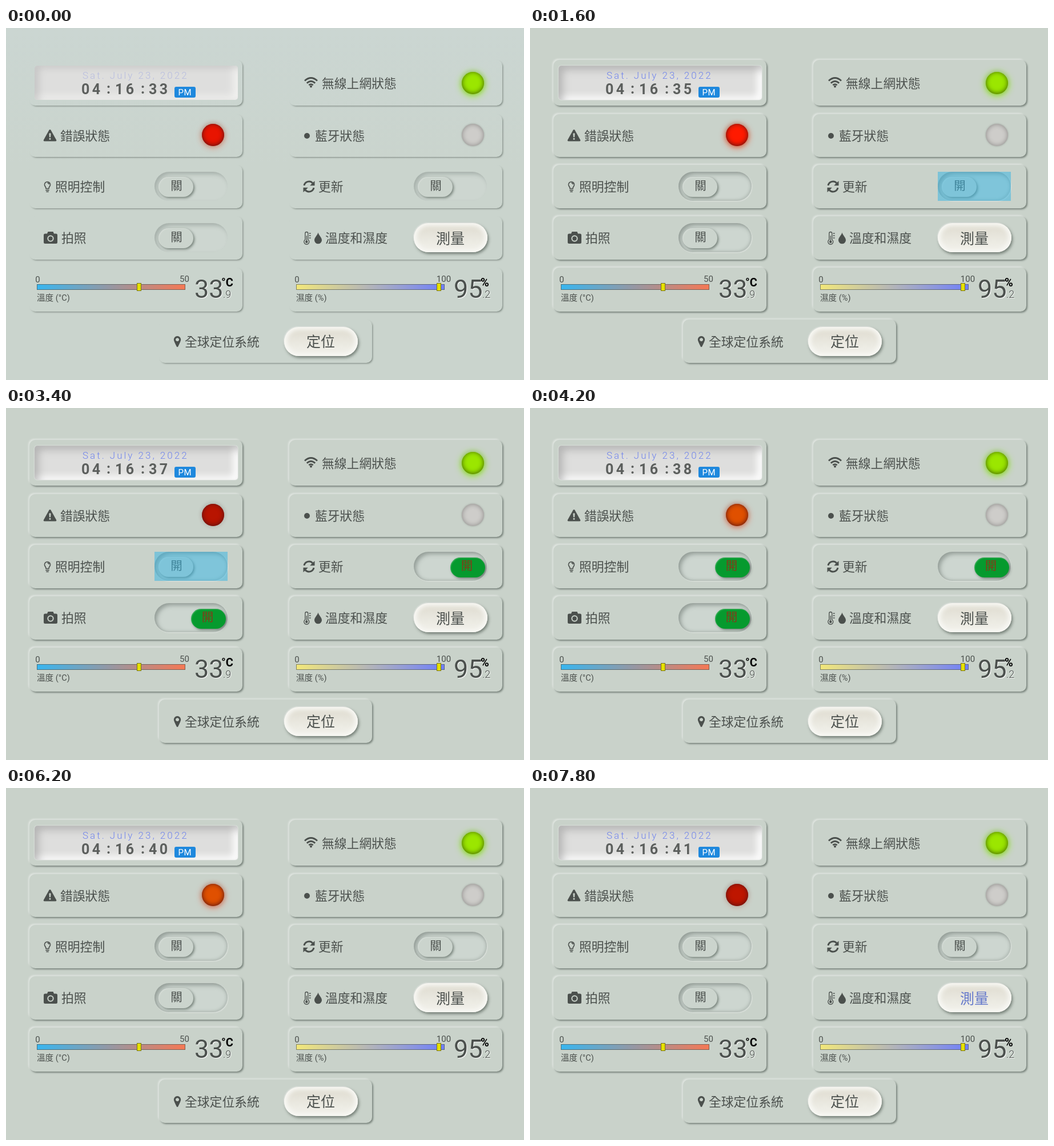
An HTML page that plays this animation: 907x617 px, repeating every 8000 ms.

```html
<!DOCTYPE html>
<html lang="zh-TW">
<head>
<meta charset="utf-8">
<title>控制面板</title>
<style>
:root { --bg: #c9d2ca; --ink: #4b504d; --light: rgba(255,255,255,.42); }
html, body { margin: 0; width: 100%; height: 100%; overflow: hidden; background: var(--bg); }
#stage { position: absolute; inset: 0; background: var(--bg); }
#stage.faint { --light: transparent; background: linear-gradient(#cbd6d2, #cad4cd 40%); }
#stage div, svg { position: absolute; box-sizing: border-box; }
svg { left: 0; top: 0; }
.panel { border-radius: 10px; background: var(--bg);
  box-shadow: 2px 2px 3px rgba(88,100,92,.7), -2px -2px 3px var(--light); }
.faint .panel { background: transparent; box-shadow: 2px 2px 3px -1px rgba(88,100,92,.7); }
.clock { border-radius: 5px; background: #dededd;
  box-shadow: inset 7px 7px 14px rgba(140,140,140,.5), inset -8px -6px 12px #fff, 0 0 2px rgba(255,255,255,.8); }
.faint .clock { box-shadow: inset 8px 4px 12px rgba(165,165,165,.4), inset -8px -6px 14px #f2f2f0; }
.pm { border-radius: 3px; background: #1e88dd; }
.led { border-radius: 50%; }
.track { border-radius: 26px; background: #cdd6d0;
  box-shadow: inset 4px 4px 7px rgba(95,105,100,.5), inset -2px -2px 4px rgba(130,140,134,.3), 1px 1px 2px var(--light); }
.faint .track { box-shadow: inset 4px 4px 7px rgba(95,105,100,.35); }
.knob { border-radius: 18px; box-shadow: 2px 2px 4px rgba(80,92,84,.7), inset 1px 1px 2px rgba(255,255,255,.25); }
.button { border-radius: 26px; background: linear-gradient(#dedbcf, #eeede6 75%);
  box-shadow: inset 0 0 7px 5px #f8f8f4, 2px 3px 5px rgba(85,96,88,.75), -1px -1px 2px rgba(255,255,255,.5); }
.bar { border: 1px solid rgba(75,80,77,.65); }
.mark { background: #e6e000; border: 1px solid #77731c; }
.tap { background: rgba(51,181,229,.5); }
text { font-family: Roboto, "Noto Sans CJK TC", "Noto Sans CJK", sans-serif; fill: var(--ink); }
.label { font-size: 21.8px; font-weight: 300; }
.big { font-size: 25px; font-weight: 300; text-anchor: middle; }
.state { font-size: 20.5px; font-weight: 300; text-anchor: middle; }
.date { font-size: 17px; font-weight: 300; letter-spacing: 3px; fill: #6f83ec; }
.faint .date { fill: #b7bcdf; }
.time { font-size: 25px; font-weight: 700; letter-spacing: 4.5px; fill: #5c5f5d; }
.ampm { font-size: 15px; letter-spacing: .5px; fill: #fff; }
.scale { font-size: 15px; text-anchor: middle; }
.caption { font-size: 14.6px; }
.value { font-size: 45px; text-shadow: 1px 1px 1px #fff; }
.decimal { font-size: 18px; font-weight: 300; text-shadow: 1px 1px 1px #fff; }
.unit { font-size: 20px; font-weight: 700; fill: #000; }
.icons { fill: var(--ink); }
.line { fill: none; stroke: var(--ink); stroke-width: 2; stroke-linecap: round; }
</style>
</head>
<body>
<div id="stage"></div>
<script>
const STEP = 200, LOOP = 8000;
const stage = document.getElementById('stage');
const svgNS = 'http://www.w3.org/2000/svg';

function box(cls, x, y, w, h, style = '') {
  const el = document.createElement('div');
  el.className = cls;
  el.style.cssText = `left:${x}px;top:${y}px;width:${w}px;height:${h}px;${style}`;
  stage.append(el);
  return el;
}

// Boxes lie below the drawing layer; tap highlights are added above it.
[[41, 56, 80], [41, 151, 75], [41, 240, 76], [41, 330, 76], [41, 420, 77],
 [496, 56, 80], [496, 151, 75], [496, 240, 76], [496, 330, 76], [496, 420, 77],
 [268, 511, 76]].forEach(([x, y, h]) => box('panel', x, y, 373, h));
box('clock', 50, 66, 356, 60);
box('pm', 295, 103, 37, 19);
const led = (x, y, style) => box('led', x, y, 39, 39, style);
led(798, 77, 'background:#9be600;box-shadow:0 -1px 7px 1px rgba(0,0,0,.12),inset 0 -1px 9px #3f6002,0 2px 13px #89f000');
led(798, 168, 'background:#cecdca;box-shadow:inset 0 0 8px #8a8886,0 0 3px rgba(110,115,110,.5)');
const red = led(343, 168);
box('button', 714, 342, 129, 51);
box('button', 487, 524, 129, 51);

const toggles = [
  { x: 260, y: 252, on: 3400, off: 4600 },
  { x: 260, y: 342, on: 2600, off: 4800 },
  { x: 714, y: 252, on: 1600, off: 5600 }
];
for (const s of toggles) {
  box('track', s.x, s.y, 128, 51);
  s.knob = box('knob', s.x + 7, s.y + 9, 61, 35);
}
const meters = [
  { x: 54, mark: 229, max: '50', from: '#38b6f0', to: '#f67854', name: '溫度 (°C)', value: '33', decimal: '.9', unit: '°C' },
  { x: 508, mark: 754, max: '100', from: '#f3e87a', to: '#7080fa', name: '濕度 (%)', value: '95', decimal: '.2', unit: '%' }
];
for (const m of meters) {
  box('bar', m.x, 448.5, 260, 10, `background:linear-gradient(90deg,${m.from},${m.to}) border-box`);
  box('mark', m.mark, 447, 8, 14);
}

const svg = document.createElementNS(svgNS, 'svg');
svg.setAttribute('width', 907);
svg.setAttribute('height', 617);
svg.innerHTML = `<g class="icons">
  <path class="line" style="stroke-width:2.8;stroke-linecap:butt"
    d="M523 92.5Q534 82.5 545 92.5M526.8 96.6Q534 90 541.2 96.6M530.4 100.3Q534 97 537.6 100.3"/>
  <circle cx="534" cy="102.5" r="2"/>
  <path d="M75.6 178.8Q77 177 78.4 178.8L88 196Q89 198.5 86.5 198.5H67.5Q65 198.5 66 196Z"/>
  <path d="M75.4 184.5h3.2l-.5 7h-2.2zM75.7 193h2.6v2.7h-2.6z" fill="#c9d2ca"/>
  <circle cx="527" cy="189" r="5"/>
  <path class="line" style="stroke-width:1.7" d="M70 281.5Q70 279.5 68.5 277.5A5 5 0 1 1 76.5 277.5Q75 279.5 75 281.5ZM70 284.3h5M71 287h3M73 271.5q2 .3 2.3 2"/>
  <g id="arrow"><path class="line" style="stroke-width:3;stroke-linecap:butt" d="M522 276A8.7 8.7 0 0 1 537 272"/><path d="M540.5 268v8.3h-8.3z"/></g>
  <use href="#arrow" transform="rotate(180 530.5 278)"/>
  <path d="M68.5 360.5H72L73.5 357H82.5L84 360.5H87.5Q90 360.5 90 363V375.5Q90 378 87.5 378H68.5Q66 378 66 375.5V363Q66 360.5 68.5 360.5Z"/>
  <circle cx="78" cy="369" r="4.7" fill="none" stroke="#c9d2ca" stroke-width="2"/>
  <path class="line" style="stroke-width:1.3" d="M523.8 371V360Q523.8 357.5 526.3 357.5Q528.8 357.5 528.8 360V371A4.5 4.5 0 1 1 523.8 371ZM531.2 360h2M531.2 364h2M531.2 368h2"/>
  <path d="M525.7 364h1.2v9h-1.2z"/><circle cx="526.3" cy="374.7" r="2.2"/>
  <path d="M546.5 358.5C548 364 553 367 553 372A6.5 6.3 0 0 1 540 372C540 367 545 364 546.5 358.5Z"/>
  <path fill-rule="evenodd" d="M300 540A6.2 6.2 0 0 1 306.2 546.5Q306 549 301.2 558.5Q300 560 298.8 558.5Q294 549 293.8 546.5A6.2 6.2 0 0 1 300 540ZM300 543.2a3 3 0 1 0 .1 0Z"/>
</g>`;
stage.append(svg);

function text(cls, x, y, content) {
  const el = document.createElementNS(svgNS, 'text');
  el.setAttribute('class', cls);
  el.setAttribute('x', x);
  el.setAttribute('y', y);
  el.textContent = content;
  svg.append(el);
  return el;
}

text('date', 134, 89, 'Sat. July 23, 2022');
text('time', 132, 116, '04');
text('time', 176, 115, ':');
text('time', 191, 116, '16');
text('time', 236, 115, ':');
const seconds = text('time', 250, 116, '');
text('ampm', 301.5, 117.5, 'PM');
[[553, 105, '無線上網狀態'], [95, 197, '錯誤狀態'], [541, 197, '藍牙狀態'],
 [86, 286, '照明控制'], [547, 286, '更新'], [97, 376, '拍照'],
 [559, 376, '溫度和濕度'], [313, 557.5, '全球定位系統']].forEach(a => text('label', ...a));
const measure = text('big', 778, 377.5, '測量');
text('big', 551, 558.5, '定位');

for (const m of meters) {
  text('scale', m.x + 1.5, 446, '0');
  text('scale', m.x + 258.5, 445, m.max);
  text('caption', m.x, 478, m.name);
  text('value', m.x + 276, 473, m.value);
  text('decimal', m.x + 326, 473, m.decimal);
  text('unit', m.x + 323, 453, m.unit);
}
for (const s of toggles) {
  s.label = text('state', 0, s.y + 32, '');
  s.tap = box('tap', s.x, s.y, 128, 51);
}

const ramp = (t, start) => {
  const p = Math.min(1, Math.max(0, (t - start) / 400));
  return p * p * (3 - 2 * p);
};
const mix = (a, b, p) => `rgb(${a.map((v, i) => Math.round(v + (b[i] - v) * p))})`;
const blink = [['#e81400', .45], ['#e05000', .6], ['#b81400', .05], ['#ff1a00', .8], ['#be1600', .15]];

function draw(now) {
  const t = Math.floor(now % LOOP / STEP) * STEP;
  stage.classList.toggle('faint', t < STEP);
  seconds.textContent = 33 + Math.floor((t + 800) / 1000);

  const [color, glow] = blink[t / STEP % 5];
  red.style.background = color;
  red.style.boxShadow = `0 -1px 7px 1px rgba(0,0,0,.15), inset 0 -1px 9px #541313, 0 2px 12px rgba(255,50,0,${glow})`;

  for (const s of toggles) {
    const p = ramp(t, s.on) - ramp(t, s.off);
    const isOn = t >= s.on && t < s.off;
    s.knob.style.transform = `translate(${57 * p}px,${p}px)`;
    s.knob.style.background = mix([203, 212, 205], [6, 154, 46], p);
    s.label.textContent = isOn ? '開' : '關';
    s.label.setAttribute('x', s.x + 38.5 + 54.5 * p);
    s.label.style.fill = mix([75, 80, 77], [132, 58, 24], p);
    s.tap.hidden = t !== s.on && t !== s.off;
  }
  measure.style.fill = t >= 7600 ? '#6579cb' : '';
}

const start = performance.now();
function tick() {
  draw(performance.now() - start);
  requestAnimationFrame(tick);
}
tick();
</script>
</body>
</html>
```
